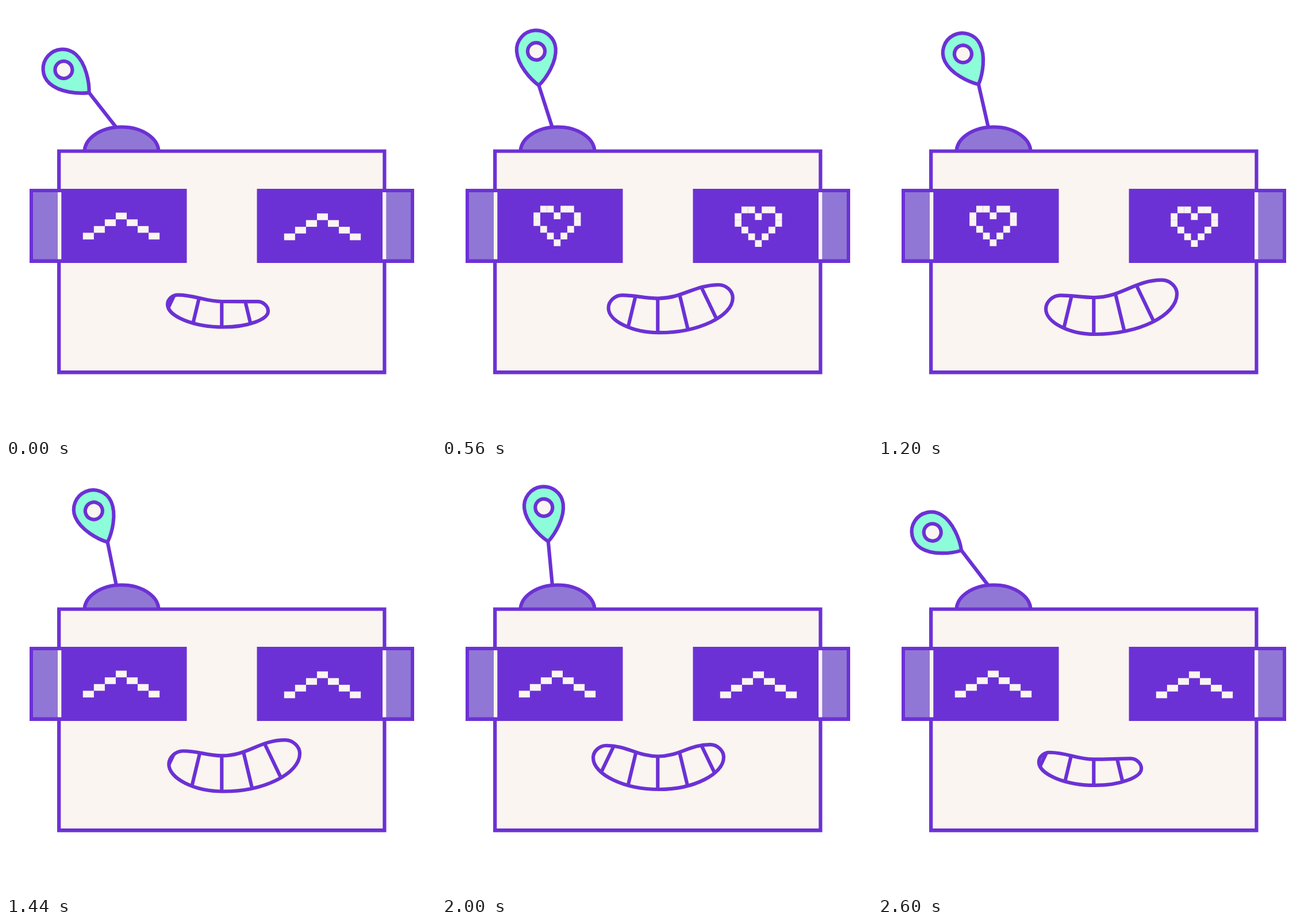
These frames come from a looping animation (748 px wide and 748 px high, 2640 ms). An HTML page with a canvas:

```html
<!DOCTYPE html>
<html lang="en">
<head>
<meta charset="utf-8">
<title>Happy robot</title>
<style>
  html, body { margin: 0; width: 100%; height: 100%; overflow: hidden; background: #fff; }
  canvas { display: block; }
</style>
</head>
<body>
<canvas id="stage" width="748" height="748"></canvas>
<script>
const ctx = document.getElementById('stage').getContext('2d');
const LOOP = 2640, STEP = 40;
const PURPLE = '#6c31d5', LAVENDER = '#9177d5', CREAM = '#faf5f0', MINT = '#8dfcd9';
const HEART_START = 280, HEART_END = 1440;

// Swings: time and angle in degrees from vertical
const stemSwing = [[0, -38], [300, -4], [800, -30], [1200, -12.8], [2120, -5], [LOOP, -38]];
const pinSwing = [[0, -48], [480, -3.5], [1200, -27], [2140, -6], [2600, -58], [LOOP, -48]];

// Mouth poses: left end, right end, top and bottom of the middle
const calm = [281, 519, 456, 531, 514, 558.5];
const smirk = [292, 527, 520, 501, 507, 571];
const grin = [263, 511, 490, 510, 508.5, 566];
const mouthPoses = [[0, ...calm], [720, ...smirk], [1200, ...smirk], [2000, ...grin], [LOOP, ...calm]];

const heart = ['.##.##.', '#..#..#', '#.....#', '.#...#.', '..#.#..', '...#...'];
const caret = ['...#...', '..#.#..', '.#...#.', '#.....#'];

const mix = (a, b, k) => a + (b - a) * k;
const linear = u => u;
const smooth = u => u * u * (3 - 2 * u);

function track(keys, t, ease) {
  const i = keys.findIndex(key => key[0] > t);
  const [from, to] = [keys[i - 1], keys[i]];
  const k = ease((t - from[0]) / (to[0] - from[0]));
  return from.slice(1).map((v, j) => mix(v, to[j + 1], k));
}

function box(color, x, y, w, h) {
  ctx.fillStyle = color;
  ctx.fillRect(x, y, w, h);
}

function paint(fill, path) {
  ctx.fillStyle = fill;
  ctx.fill(path);
  ctx.stroke(path);
}

function drawAntenna(stem, pin) {
  const rad = Math.PI / 180, length = 77;
  const x = length * Math.sin(stem * rad), y = -length * Math.cos(stem * rad);
  ctx.save();
  ctx.translate(192, 211.5);
  ctx.stroke(new Path2D(`M0 0L${x} ${y}`));
  ctx.translate(x, y);
  ctx.rotate(pin * rad);
  paint(MINT, new Path2D('M0 0C-14 -12 -34 -38 -34 -62A34 34 0 0 1 34 -62C34 -38 14 -12 0 0Z'));
  const hole = new Path2D();
  hole.arc(0, -59.5, 15, 0, 7);
  paint(CREAM, hole);
  ctx.restore();
  paint(LAVENDER, new Path2D('M136.5 254A64.5 43.5 0 0 1 265.5 254'));
}

function drawPixels(rows, x, y, w, h) {
  rows.forEach((row, r) => [...row].forEach((cell, c) => {
    if (cell === '#') box(CREAM, x + c * w, y + r * h, w, h);
  }));
}

function drawEyes(inLove) {
  for (const x of [41, 436.5]) box(PURPLE, x, 318, 273.5, 129);
  for (const x of [47, 661]) box(LAVENDER, x, 324, 43, 116.5);
  for (const x of [90, 655]) box(CREAM, x, 324, 6.3, 116.5);
  for (const [dx, dy] of [[0, 0], [350, 1.3]]) {
    if (inLove) drawPixels(heart, 159.2 + dx, 347.5 + dy, 11.75, 11.7);
    else drawPixels(caret, 133.8 + dx, 359.5 + dy, 19.05, 11.65);
  }
}

function drawMouth([leftX, leftY, rightX, rightY, top, bottom]) {
  const middle = 376, height = bottom - top;
  const left = [leftX, leftY], right = [rightX, rightY];
  const leftHump = [leftX + height * 0.4, leftY - height * 0.37];
  const rightHump = [rightX - height * 0.41, rightY - height * 0.38];
  const lips = new Path2D();
  lips.moveTo(...left);
  // Leave each point upright or level, and reach the next one level or upright
  const corner = ([x1, y1], [x2, y2], upright, k = 0.53) => upright
    ? lips.bezierCurveTo(x1, mix(y1, y2, k), mix(x2, x1, k), y2, x2, y2)
    : lips.bezierCurveTo(mix(x1, x2, k), y1, x2, mix(y2, y1, k), x2, y2);
  const wave = ([x1, y1], [x2, y2]) =>
    lips.bezierCurveTo(mix(x1, x2, 0.4), y1, mix(x2, x1, 0.4), y2, x2, y2);
  corner(left, leftHump, true);
  wave(leftHump, [middle, top]);
  wave([middle, top], rightHump);
  corner(rightHump, right, false);
  corner(right, [middle + 2, bottom], true);
  corner([middle + 2, bottom], left, false);
  lips.closePath();

  ctx.save();
  ctx.clip(lips);
  for (let i = -2; i <= 2; i++) {
    const x = middle - 0.7 + i * (34.5 + 3 * Math.abs(i)), lean = 0.24 * i;
    ctx.stroke(new Path2D(`M${x - 40 * lean} 460L${x + 80 * lean} 580`));
  }
  ctx.restore();
  ctx.stroke(lips);
}

function frame() {
  const t = Math.floor((performance.now() - start) % LOOP / STEP) * STEP;
  box('#fff', 0, 0, 748, 748);
  ctx.strokeStyle = PURPLE;
  ctx.lineWidth = 6.2;
  drawAntenna(...track(stemSwing, t, smooth), ...track(pinSwing, t, smooth));
  box(PURPLE, 89, 249.5, 572.5, 391);
  box(CREAM, 95.3, 255.5, 560, 378.5);
  drawEyes(t >= HEART_START && t < HEART_END);
  drawMouth(track(mouthPoses, t, linear));
  requestAnimationFrame(frame);
}

const start = performance.now();
frame();
</script>
</body>
</html>
```
